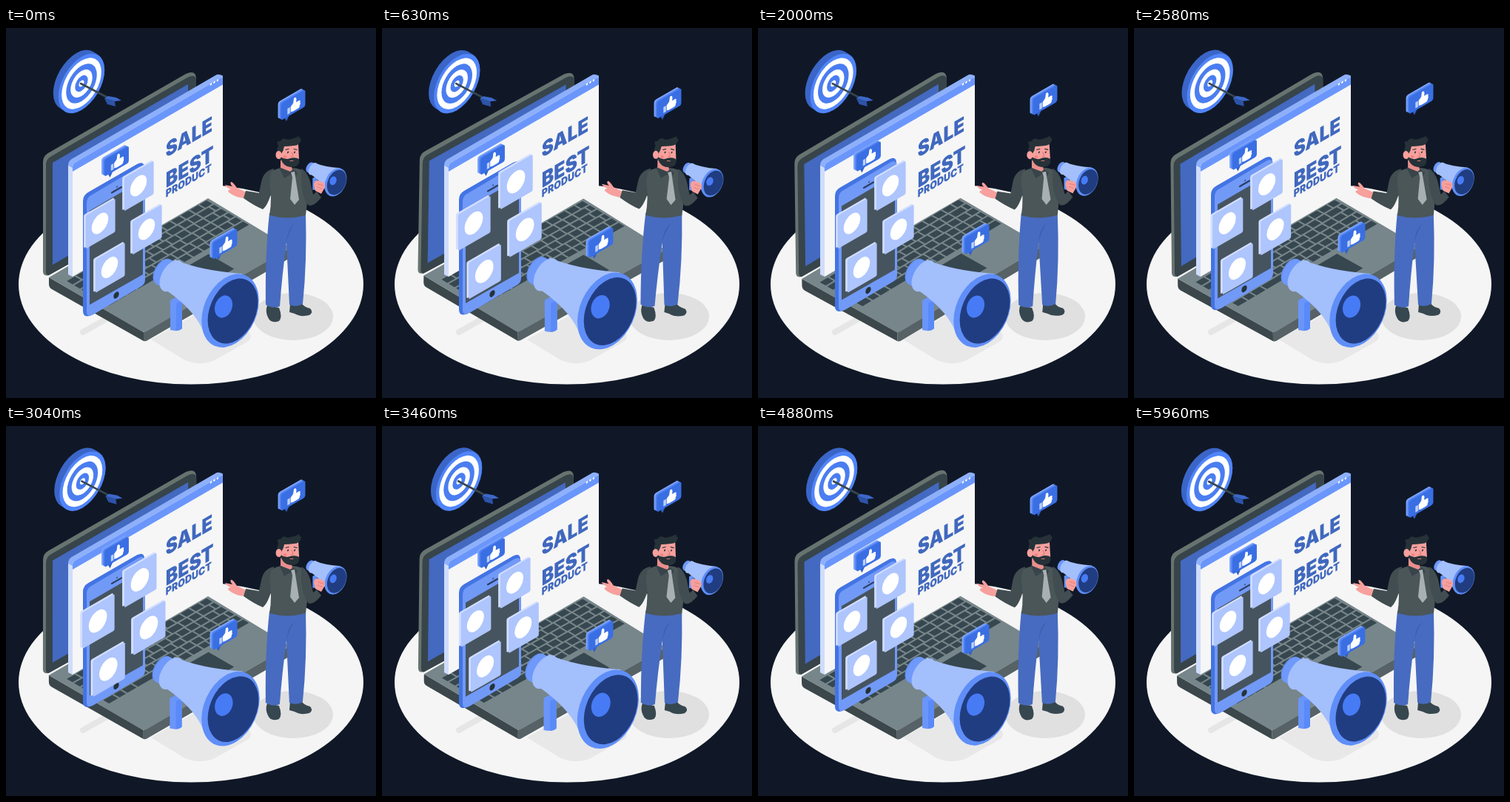
These frames come from a looping animation (500 by 500 pixels, 6000 ms). An HTML page:

```html
<!DOCTYPE html>
<html lang="en">
<head>
<meta charset="utf-8">
<title>Online promotion</title>
<style>
  html, body { margin: 0; width: 100%; height: 100%; overflow: hidden; background: #101827; }
  svg { display: block; width: 100vw; height: 100vh; }
  text { font-family: Inter, "Noto Sans", sans-serif; font-weight: 900; fill: #4068be; }
</style>
</head>
<body>
<svg id="stage" viewBox="0 0 500 500"></svg>
<script>
const stage = document.getElementById('stage');

// Drawing helpers: the upright isometric plane rises to the right.
const plane = (x, y) => `transform="matrix(.866 -.5 0 1 ${x} ${y})"`;
const path = (d, fill, extra = '') => `<path d="${d}" fill="${fill}" ${extra}/>`;
const line = (d, color, width) =>
  path(d, 'none', `stroke="${color}" stroke-width="${width}" stroke-linecap="round" stroke-linejoin="round"`);
const disc = (x, y, r, fill) => `<circle r="${r}" fill="${fill}" ${plane(x, y)}/>`;
const ellipse = (x, y, rx, ry, fill, turn = 0) =>
  `<ellipse rx="${rx}" ry="${ry}" fill="${fill}" transform="translate(${x} ${y}) rotate(${turn})"/>`;
const panel = (x, y, w, h, r, fill) =>
  `<rect x="${-w / 2}" y="${-h / 2}" width="${w}" height="${h}" rx="${r}" fill="${fill}" ${plane(x, y)}/>`;
const repeat = (n, make) => Array.from({ length: n }, (_, i) => make(i)).join('');
const group = (id, body) => `<g id="${id}">${body}</g>`;

const floor = ellipse(250, 346.3, 233, 135.3, '#f5f5f5')
  + line('M104 411L150 385', '#e6e6e6', 8)
  + path('M196 421L290 368L330 413Q333 420 326 424L280 450Q262 457 242 449Z', '#e8e8e8')
  + ellipse(388, 390, 54, 32, '#e0e0e0');

const target = repeat(8, i => disc(95 + i, 70 + i * .6, 36, '#3b66c8'))
  + [[36, '#5085fa'], [31, '#fff'], [24, '#4a7df0'], [17, '#fff'], [10, '#4a7df0'], [4, '#fff']]
      .map(([r, fill]) => disc(102, 75, r, fill)).join('')
  + line('M101 75L145 98', '#37474f', 2.6)
  + path('M133 95L138 92L149 94L156 98L147 99Z', '#3c68c9')
  + path('M133 95L147 99L148 106L137 103Z', '#2d53a8');

const keyRow = i => {
  const y = 23.5 + i * 11.4;
  const dash = i === 5 ? '14 2.4 10 2.4 14 2.4 70 2.4 12 2.4' : i % 2 ? '17 2.4 12 2.4 12 2.4' : '12.4 2.4';
  return `<path d="M9 ${y}H227" stroke="#37474f" stroke-width="9" stroke-dasharray="${dash}"/>`;
};

const laptop =
  path('M58 337L186 411V423L62 353Q58 351 58 346Z', '#3b474b')
  + path('M186 411L384 297V308Q384 311 380 313L193 421Q189 424 186 423Z', '#566265')
  + path('M58 337L258 221L384 297L190 410Q186 412 182 409Z', '#77868a')
  + `<g transform="matrix(.866 -.5 .866 .5 58 337)">${repeat(6, keyRow)}
     <rect x="78" y="93" width="78" height="40" fill="#37474f"/></g>`
  + path('M50 181Q50 173 57 169L243 62Q257 56 257 69V223L58 334Q50 336 50 329Z', '#67736f')
  + path('M54 185Q54 178 60 174L245 67Q257 61 257 71V223L58 334Q54 335 54 329Z', '#37444a')
  + path('M63 182L246 76V214L63 320Z', '#4369c0');

const screen =
  path('M84 185.5Q84 180.5 88 177.5L283 64Q287 61.5 293 64.5V75L90 192V336L84 333Z', '#8eb0fb')
  + path('M90 188Q90 184 93 182L290 67.5Q293 66 293 70V218.5L90 336Z', '#f6f6f6')
  + path('M90 192V187Q90 184 93 182L290 67.5Q293 66 293 69V76.5L90 194Z', '#6a96fc')
  + path('M84 186V333L90 336V189Z', '#cfdcfb')
  + [[277, 76], [281.5, 73.4], [286, 70.8]].map(([x, y]) => disc(x, y, 1.4, '#fff')).join('')
  + [['SALE', 28, 175.4], ['BEST', 28.5, 216.4], ['PRODUCT', 14.4, 229.2]]
      .map(([word, size, y]) => `<text font-size="${size}" ${plane(215.8, y)}>${word}</text>`).join('');

const phone =
  path('M104 234Q104 226 111 222L177 184Q187 179 187 189V340Q187 346 182 349L118 387Q104 394 104 382Z', '#4374e4')
  + path('M109 237Q109 229 115 226L179 188Q188 184 188 193V340Q188 346 183 349L118 387Q109 392 109 383Z', '#7199f6')
  + path('M113 247L185 205V333L113 374Z', '#46545f')
  + line('M143 222.5L156 215', '#2c3e63', 2.2)
  + disc(150, 214.5, 1, '#2c3e63')
  + disc(149, 361, 4.2, '#263238');

const tile = (x, y) => panel(x - 1.5, y - .8, 47, 45, 2, '#d2deff')
  + panel(x + .7, y + .4, 46, 45, 2, '#aec5fd') + disc(x, y, 13, '#fff');
const tiles = [[179, 213], [127, 264], [190, 272], [140, 323.5]]
  .map(p => tile(...p)).join('');

const bubble = (x, y) => `<g class="float">${panel(x - 4, y - 2, 38, 23, 3, '#7da4fb')}
  ${panel(x - 2, y - 1, 38, 23, 3, '#5385f3')}
  ${path(`M${x - 13} ${y + 15}L${x - 9} ${y + 22}L${x - 3} ${y + 9}Z`, '#2f60cd')}
  ${panel(x, y, 38, 23, 3, '#3a6fe4')}
  <g fill="#fff" ${plane(x + 1, y)}><path fill="#bcd0fd" d="M-10 0H-6V8H-10Z"/>
  <path d="M-5 0L-1 -3L0 -9Q4 -10 4 -5L3.5 -2H8.5Q11 -1 9.5 1.5Q11 3 9 5Q9.5 8 6 8H-1L-5 7Z"/></g></g>`;

// Drawn around the centre of the bell.
const horn =
  path('M-81 -14L-74 -18L-65 -13V24Q-70 29 -81 26Z', '#6a95fa')
  + path('M-73 -10L-65 -14V24Q-68 27 -73 27Z', '#5a8af8')
  + repeat(10, i => disc(-91 + i * 1.4, -53 + i * .8, 15.5, i ? '#6f99fa' : '#6490f3'))
  + disc(-79, -47, 19, '#a3bffc')
  + path('M-75 -69Q-40 -54 16 -50L0 0L-20 48L-34 34Q-44 2 -87 -28Z', '#a3bffc')
  + ellipse(0, 0, 35.5, 52, '#5f8ef8', 24)
  + ellipse(3.5, .5, 31, 46, '#213d81', 24)
  + ellipse(-9, -5.5, 11.5, 15.5, '#477bf5', 20);

const man =
  path('M353 375L369 378Q374 391 369 396Q358 400 354 391Q350 383 353 375Z', '#37474f')
  + path('M384 373L399 371Q402 377 411 379Q416 384 410 388Q398 391 390 386L383 384Z', '#37474f')
  + path('M356 250L405 250Q407 315 401 373Q392 378 383 374L379 290Q373 335 370 376Q361 380 351 374Q350 305 356 250Z', '#476bc0')
  + path('M379 290Q380 274 390 264Q381 276 379 290Z', '#35549d')
  + path('M325 222L312 216Q306 207 304 208Q302 210 306 214L296 212Q298 216 304 218Q298 219 301 222Q309 229 323 230Z', '#f7a09d')
  + path('M362 190Q348 193 345 208L342 223L324 220L321 230Q335 240 347 245Q354 240 360 218Z', '#414d50')
  + path('M358 195Q366 188 382 189Q403 188 406 201Q409 226 405 253Q380 260 356 253Q360 230 356 207Z', '#4a5658')
  + path('M371 176L385 182L387 193Q379 198 371 189Z', '#e98f8d')
  + path('M369 188L384 194L388 191L394 196L389 203L384 198L376 203Z', '#38444a')
  + path('M385 195L390 194L391 201L396 232L390 239L384 231L387 202Z', '#a8b0b3')
  + path('M399 190Q407 194 411 207L415 225L420 221L426 229Q415 243 408 239Q401 230 399 210Z', '#414d50')
  + path('M371 156Q384 151 395 157L396 177Q393 186 383 185Q373 184 371 174Z', '#f7a09d')
  + path('M371 174Q378 179 384 176Q391 174 396 177Q398 188 385 188Q373 187 371 174Z', '#263238')
  + path('M369 178Q364 167 368 159Q364 152 371 153Q374 147 381 151Q388 150 397 146Q395 149 399 150Q397 159 389 159Q381 160 376 160Q375 166 372 170L372 179Z', '#263238')
  + ellipse(368.5, 171.5, 4, 5.5, '#f7a09d')
  + ellipse(377, 174, 2.4, 1.8, '#ee827f')
  + disc(381, 168, 1.2, '#263238') + disc(390, 168, 1.2, '#263238')
  + line('M378 164.5L382 163.5M389 163.5L393 164.5', '#263238', 1.2)
  + line('M386 168L388 173L385 174', '#dc7773', 1)
  + line('M384 179.5L388 179.5', '#dc7773', 1)
  + `<g transform="translate(445.5 208.5) scale(.385)">${horn}</g>`
  + path('M416 212Q416 206 421 206L428 208Q433 211 430 217L426 224L418 220Z', '#f7a09d')
  + line('M422 211L429 213M421 215L427 217', '#dc7773', .8);

stage.innerHTML = floor
  + group('target', target) + group('laptop', laptop) + screen
  + `<g class="float">${phone}</g>` + bubble(149.5, 180) + group('tiles', tiles)
  + group('horn', `<g transform="translate(303 382)">${horn}</g>`)
  + bubble(296, 292) + group('man', man) + bubble(388, 104);

// Straight-line interpolation between [progress, value] keys.
function track(keys, p) {
  const i = keys.findIndex(k => k[0] > p);
  const [a, from] = keys[i - 1], [b, to] = keys[i];
  return from + (to - from) * (p - a) / (b - a);
}

const LOOP = 6000;
const rise = [[0, 0], [.5, -9.8], [1, 0]];
const sway = [[0, 0], [.25, 1], [.75, -1], [1, 0]];
const drift = [[0, 0], [.2, -1.5], [.6, 2.3], [1, 0]];
const beat = [[0, 1], [.1, 1.1], [.3, 1], [.4, 1], [.5, 1.1], [.6, 1], [1, 1]];

const floaters = stage.querySelectorAll('.float');
const move = (id, value) => document.getElementById(id).setAttribute('transform', value);
const grow = (s, x, y) => `translate(${x} ${y}) scale(${s}) translate(${-x} ${-y})`;

function draw(now) {
  const slow = now % LOOP / LOOP, fast = slow * 2 % 1;
  const dx = track(drift, slow), tilt = track(sway, fast);
  floaters.forEach(el => el.setAttribute('transform', `translate(0 ${track(rise, slow)})`));
  move('target', `translate(${dx} ${-dx * .25})`);
  move('laptop', `rotate(${tilt * 1.1} 216 235)`);
  move('man', `rotate(${tilt} 380 272)`);
  move('tiles', grow(track(beat, slow), 158, 268));
  move('horn', grow(track(beat, fast), 270, 372));
}

const start = performance.now();
function tick() {
  draw(performance.now() - start);
  requestAnimationFrame(tick);
}
tick();
</script>
</body>
</html>
```
